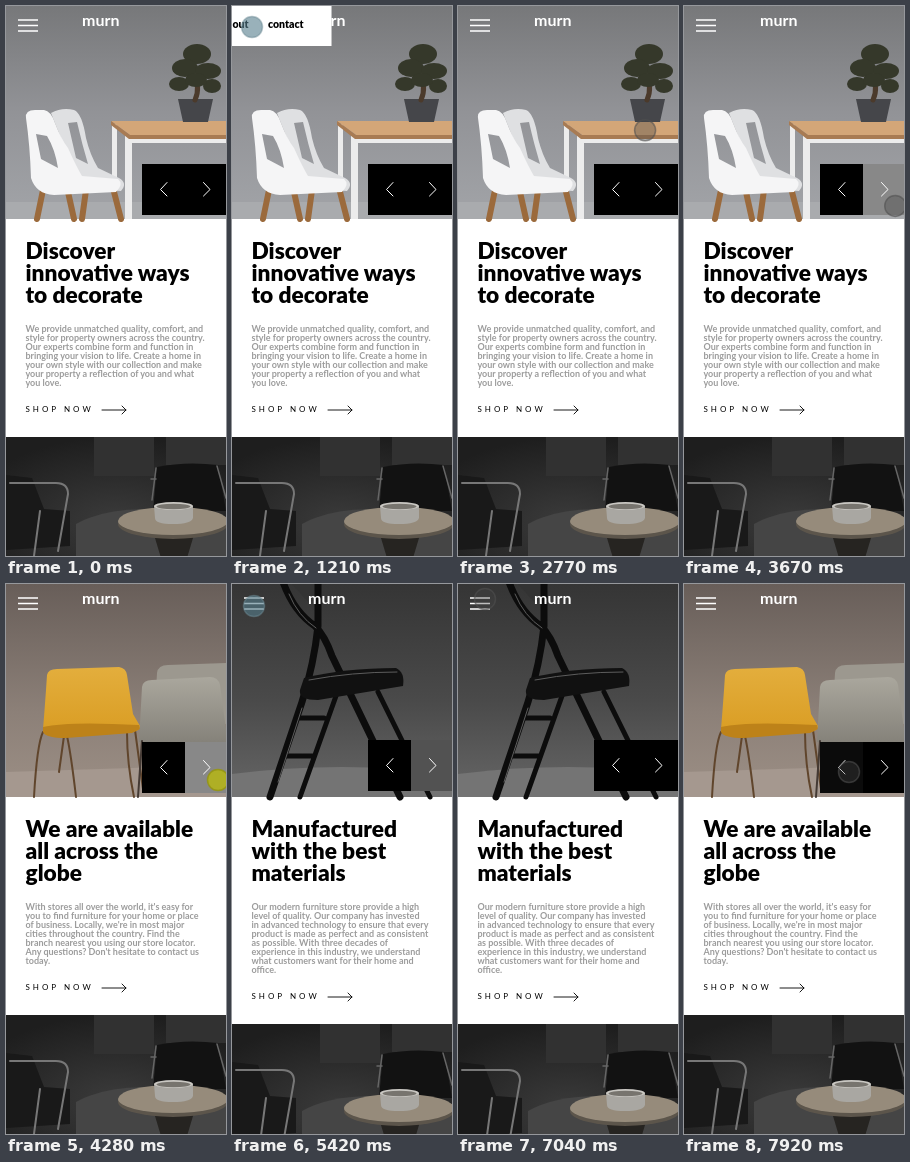
Recreate the animation shown at these times as an HTML page. Size 220x550 px, loop 7.99 s.

```html
<!DOCTYPE html>
<html lang="en">
<head>
<meta charset="utf-8">
<title>Furniture store</title>
<style>
  html, body { margin: 0; width: 100%; height: 100%; overflow: hidden; background: #fff; }
  svg { display: block; width: 220px; height: 550px; font-family: Lato, sans-serif; }
  .title { font-size: 22.7px; font-weight: 900; }
  .copy { font-size: 9px; font-weight: 700; fill: #9c9c9c; }
  .shop { font-size: 8px; letter-spacing: 3px; }
  .brand { font-size: 16px; font-weight: 700; fill: #fff; }
  .nav { font-size: 10.5px; font-weight: 900; text-anchor: end; }
  .line { fill: none; stroke-linecap: round; stroke-linejoin: round; }
</style>
</head>
<body>
<svg viewBox="0 0 220 550">
  <defs>
    <linearGradient id="greyWall" x2="0" y2="1">
      <stop stop-color="#77787a"/><stop offset=".5" stop-color="#929397"/><stop offset="1" stop-color="#a2a4a8"/>
    </linearGradient>
    <linearGradient id="brownWall" x2="0" y2="1">
      <stop stop-color="#685e59"/><stop offset=".6" stop-color="#8c8078"/><stop offset="1" stop-color="#9c8f85"/>
    </linearGradient>
    <linearGradient id="darkWall" x2="0" y2="1">
      <stop stop-color="#353535"/><stop offset=".55" stop-color="#4a4a4a"/><stop offset="1" stop-color="#666"/>
    </linearGradient>
    <linearGradient id="yellow" x2="0" y2="1">
      <stop stop-color="#e3ae3d"/><stop offset="1" stop-color="#d99c22"/>
    </linearGradient>
    <linearGradient id="shell" x2="0" y2="1">
      <stop stop-color="#aaa79d"/><stop offset="1" stop-color="#85827a"/>
    </linearGradient>
    <radialGradient id="lounge" cx=".5" cy=".7" r=".7">
      <stop stop-color="#3b3b3b"/><stop offset="1" stop-color="#1e1e1e"/>
    </radialGradient>
  </defs>

  <g class="slide">
    <path fill="url(#greyWall)" d="M0 0H220V213H0Z"/>
    <path fill="#a9abae" d="M0 196H220V213H0Z"/>
    <path fill="#ececec" d="M106 118h5v62h-5zM119 130h7v83h-7zM119 132h101v5H119z"/>
    <path fill="#d3a678" d="M105 115H220V129H124Z"/>
    <path fill="#a87b53" d="M105 115L124 129H220V133H123L105 119Z"/>
    <path fill="#45464a" d="M172 93H207L202 116H177Z"/>
    <path class="line" stroke="#4b3a2b" stroke-width="5" d="M189 94Q195 80 187 70T192 50"/>
    <g fill="#35382a">
      <ellipse cx="191" cy="48" rx="14" ry="10"/><ellipse cx="179" cy="62" rx="13" ry="9"/>
      <ellipse cx="202" cy="65" rx="13" ry="8"/><ellipse cx="173" cy="78" rx="10" ry="7"/>
      <ellipse cx="206" cy="80" rx="9" ry="7"/><ellipse cx="190" cy="74" rx="11" ry="7"/>
    </g>
    <path class="line" stroke="#9b6a3c" stroke-width="6" d="M37 184L31 213M62 186L68 213M80 184L76 213M107 182L115 213"/>
    <path fill="#dfe0e2" fill-rule="evenodd" d="M45 107Q56 101 68 104Q76 107 80 132Q84 149 92 162L113 172Q122 177 115 185L75 182ZM62 117L70 152L82 158Q76 138 71 116Z"/>
    <path fill="#f5f5f6" fill-rule="evenodd" d="M20 112Q19 104 29 104H38Q45 105 49 117Q55 133 62 142Q70 160 76 170L112 173Q118 178 110 186L48 189Q30 188 25 172Q24 140 20 112ZM30 128L35 153L52 162Q49 143 41 130Z"/>
  </g>

  <g class="slide">
    <path fill="url(#brownWall)" d="M0 0H220V213H0Z"/>
    <path fill="#a5988f" d="M0 188L220 181V213H0Z"/>
    <path class="line" stroke="#60452c" stroke-width="2" d="M37 148Q31 160 28 213M61 152Q65 170 70 213M58 152L53 188M121 148Q121 180 128 213M129 146L137 205"/>
    <path fill="url(#yellow)" d="M41 91Q42 85 51 85L113 83Q120 84 121 91L127 130L134 142Q134 147 126 148L60 153Q40 153 37 145Q39 122 41 91Z"/>
    <path fill="#bd8219" d="M37 143Q62 137 133 141L134 145L126 149L60 154Q40 154 37 148Z"/>
    <path fill="#9c988f" d="M151 89Q152 81 162 81L220 79V140H148Z"/>
    <path fill="url(#shell)" d="M136 103Q137 96 146 96L204 93Q212 93 214 101L220 145V158H133Z"/>
    <path class="line" stroke="#443a34" stroke-width="2" d="M136 157L132 213"/>
  </g>

  <g class="slide">
    <path fill="url(#darkWall)" d="M0 0H220V213H0Z"/>
    <path fill="#747474" d="M0 190Q110 176 220 190V213H0Z"/>
    <path fill="#333" d="M60 0H90L78 20Z"/>
    <g class="line" stroke="#0c0c0c" stroke-width="7">
      <path d="M51 -2Q62 28 83 42Q93 52 100 72L168 213M86 -2V42Q82 80 70 118L38 213"/>
      <path stroke-width="5" d="M104 112L68 213M146 108L198 213M66 134H92M54 172H81"/>
    </g>
    <path fill="#111" d="M72 94Q112 84 164 84Q173 88 171 102L86 116Q66 116 68 106Z"/>
    <path class="line" stroke="#5d5d5d" d="M77 96Q120 88 165 88M57 10Q66 32 84 44M70 124L46 198"/>
  </g>

  <g id="controls">
    <path d="M136 158h84v51h-84z"/>
    <path id="prev" fill="#888" d="M136 158h43v51h-43z"/>
    <path id="next" fill="#888" d="M179 158h41v51h-41z"/>
    <path class="line" stroke="#fff" d="M161 176.500L154.500 183.500L161 190M197.500 176.500L204 183.500L197.500 190"/>
  </g>

  <path stroke="#fff" stroke-width="1.300" d="M12 14h20M12 19.500h20M12 25h20"/>
  <text class="brand" x="76" y="20">murn</text>

  <g id="copy"></g>

  <g id="lower">
    <text class="shop" x="19.500" y="406">SHOP NOW</text>
    <path class="line" stroke="#000" stroke-width=".9" d="M96 404H120M116 400L120 404L116 408"/>
    <path fill="url(#lounge)" d="M0 431H220V552H0Z"/>
    <path fill="#313131" d="M88 431H148V470H88ZM160 431H220V459H160Z"/>
    <path fill="#454545" d="M70 518Q120 490 220 515V552H70Z"/>
    <path fill="#191919" d="M0 469L26 472L38 503L64 505V540L0 544Z"/>
    <path class="line" stroke="#777" stroke-width="2" d="M4 477H50Q62 477 62 488L52 545M34 505L28 550"/>
    <path fill="#121212" d="M151 461Q180 455 212 459L220 505H147Z"/>
    <path class="line" stroke="#666" stroke-width="1.500" d="M150 462L146 494M145 473H150M211 460L220 492"/>
    <path fill="#262421" d="M146 522H190L181 552H155Z"/>
    <ellipse cx="167" cy="518" rx="55" ry="15" fill="#5c554b"/>
    <ellipse cx="167" cy="515" rx="55" ry="14" fill="#968b7b"/>
    <path fill="#a9a7a2" d="M148 500H187V512Q185 518 167 518T149 512Z"/>
    <ellipse cx="167.500" cy="500" rx="19.500" ry="4" fill="#c9c7c2"/>
    <ellipse cx="167.500" cy="500.500" rx="17" ry="2.800" fill="#77746e"/>
  </g>

  <g id="menu">
    <path fill="#fff" d="M0 0H220V40H0Z"/>
    <path class="line" stroke="#777" stroke-width="1.500" d="M16 16l8 8m0-8l-8 8"/>
    <g class="nav">
      <text x="60" y="22">home</text><text x="97" y="22">shop</text>
      <text x="137" y="22">about</text><text x="192" y="22">contact</text>
    </g>
  </g>

  <circle id="cursor" r="10.500" stroke-width="1.500"/>
</svg>
<script>
const LOOP = 7990;
const find = id => document.getElementById(id);
const photos = [...document.querySelectorAll('.slide')];
const controls = find('controls'), prev = find('prev'), next = find('next');
const copy = find('copy'), lower = find('lower'), menu = find('menu'), cursor = find('cursor');

const stories = [
  ['Discover|innovative ways|to decorate',
   'We provide unmatched quality, comfort, and|style for property owners across the country.|Our experts combine form and function in|bringing your vision to life. Create a home in|your own style with our collection and make|your property a reflection of you and what|you love.'],
  ['We are available|all across the|globe',
   "With stores all over the world, it's easy for|you to find furniture for your home or place|of business. Locally, we're in most major|cities throughout the country. Find the|branch nearest you using our store locator.|Any questions? Don't hesitate to contact us|today."],
  ['Manufactured|with the best|materials',
   'Our modern furniture store provide a high|level of quality. Our company has invested|in advanced technology to ensure that every|product is made as perfect and as consistent|as possible. With three decades of|experience in this industry, we understand|what customers want for their home and|office.']
];

const lines = (text, style, y, step) => text.split('|').map((line, i) =>
  `<text class="${style}" x="19.500" y="${y + i * step}">${line}</text>`).join('');
copy.innerHTML = stories.map(([title, body]) =>
  `<g>${lines(title, 'title', 253, 22)}${lines(body, 'copy', 326, 9)}</g>`).join('');
const texts = [...copy.children];

// Pointer stops: time, x, y
const path = [
  [260, 232, 562], [420, 180, 400], [640, 70, 130], [880, 20, 24], [1080, 20, 24], [1150, 20, 21],
  [2480, 20, 21], [2600, 90, 52], [2700, 160, 102], [2770, 187, 124], [2970, 206, 185],
  [3040, 206, 185], [3350, 207, 221], [3730, 212, 196], [4700, 212, 196], [5100, 205, 180],
  [5250, 120, 110], [5420, 22, 22], [5910, 22, 22], [6190, 20, 20], [6460, 20, 20],
  [6800, 25, 13], [7040, 27, 15], [7310, 27, 15], [7640, 158, 182], [7920, 165, 188]
];

const clamp = v => Math.min(1, Math.max(0, v));
const ramp = (t, from, to) => clamp((t - from) / (to - from));
const easeOut = u => 1 - (1 - u) ** 2;
const within = (t, ...spans) => spans.some(([a, b]) => t >= a && t < b);

function pointer(t) {
  const i = path.findIndex(stop => stop[0] > t);
  if (i < 0) return path[path.length - 1].slice(1);
  const [t0, x0, y0] = path[Math.max(0, i - 1)], [t1, x1, y1] = path[i];
  const u = t1 > t0 ? ramp(t, t0, t1) : 0;
  return [x0 + (x1 - x0) * u, y0 + (y1 - y0) * u];
}

function draw(t) {
  const slide = t < 3930 ? 0 : t < 4350 || t >= 7780 ? 1 : 2;
  [photos, texts].forEach(set => set.forEach((el, i) => el.style.display = i === slide ? '' : 'none'));
  controls.setAttribute('transform', `translate(0 ${slide === 2 ? -2 : 0})`);
  lower.setAttribute('transform', `translate(0 ${slide === 2 ? 9 : 0})`);

  next.style.opacity = ramp(t, 2950, 3250) - ramp(t, 5240, 5700);
  prev.style.opacity = ramp(t, 7900, 8150);

  const open = easeOut(ramp(t, 1133, 1433)) - easeOut(ramp(t, 2270, 2570));
  menu.setAttribute('transform', `translate(${220 * (open - 1)} 0)`);

  const [x, y] = pointer(t);
  cursor.setAttribute('transform', `translate(${x} ${y})`);
  cursor.style.display = t < 260 ? 'none' : '';
  const [fill, stroke] =
    within(t, [3860, 4000], [4210, 4350], [7640, 7780]) ? ['rgba(182,182,20,.85)', 'rgba(150,150,20,.9)'] :
    within(t, [1080, 2400], [5380, 6460]) ? ['rgba(85,125,140,.6)', 'rgba(110,140,150,.5)'] :
    ['rgba(70,70,70,.35)', 'rgba(80,80,80,.6)'];
  cursor.setAttribute('fill', fill);
  cursor.setAttribute('stroke', stroke);
}

const start = performance.now();
function tick() {
  draw((performance.now() - start) % LOOP);
  requestAnimationFrame(tick);
}
tick();
</script>
</body>
</html>
```
